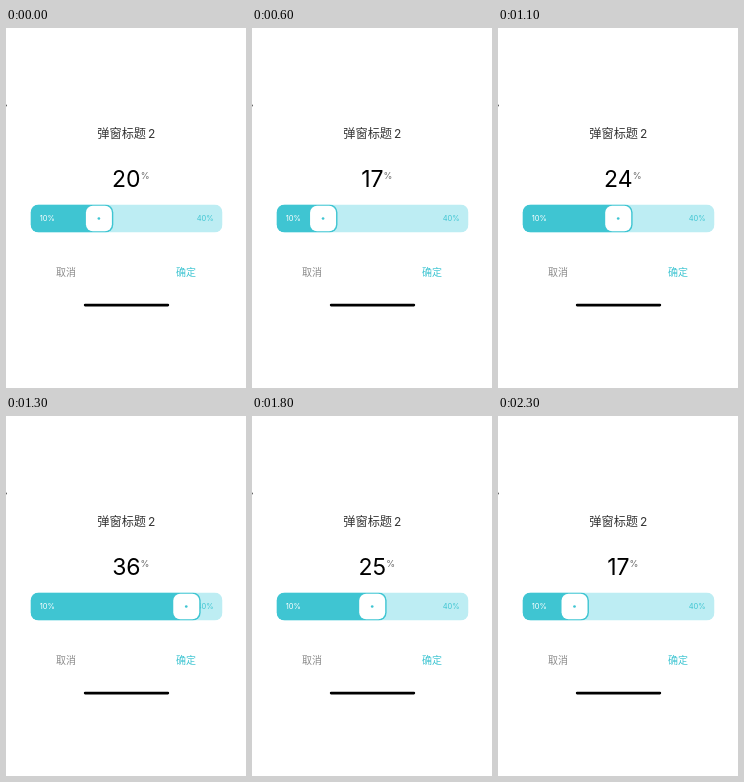
An HTML page for the animation above (2400 ms loop, 240x360 px).

```html
<!DOCTYPE html>
<html lang="zh-CN">
<head>
<meta charset="utf-8">
<title>弹窗标题 2</title>
<style>
  html, body { margin: 0; width: 100%; height: 100%; overflow: hidden; background: #fff; }
  svg { display: block; width: 100vw; height: 100vh; }
  text { font-family: Inter, "Noto Sans CJK SC", "Noto Sans CJK", sans-serif; }
  .han { font-family: "Noto Sans CJK SC", "Noto Sans CJK", sans-serif; }
  .accent { fill: #3fc5d2; }
</style>
</head>
<body>
<svg viewBox="0 0 240 360">
  <defs>
    <clipPath id="bar"><rect x="24.5" y="176.5" width="192" height="28" rx="8"/></clipPath>
  </defs>
  <circle cx="0" cy="77.5" r="1" fill="#555"/>

  <text class="han" x="91.3" y="110.3" font-size="12.2" fill="#333">弹窗标题</text>
  <text x="142" y="110.3" font-size="12" fill="#333">2</text>

  <text x="124.8" y="159.3" text-anchor="middle" font-size="23" fill="#000"><tspan id="num">20</tspan><tspan dy="-8.3" font-size="9" fill="#666">%</tspan></text>

  <g clip-path="url(#bar)">
    <rect x="24.5" y="176.5" width="192" height="28" fill="#bdedf3"/>
    <text class="accent" x="190.7" y="193.2" font-size="7.5">40%</text>
    <rect id="fill" class="accent" x="24.5" y="176.5" height="28" rx="8"/>
    <text x="33.7" y="193.2" font-size="7.5" fill="#fff">10%</text>
    <g id="knob">
      <rect x="-13" y="177.8" width="26" height="25.5" rx="7" fill="#fff"/>
      <circle class="accent" cy="190.5" r="1.35"/>
    </g>
  </g>

  <text class="han" x="60" y="248" text-anchor="middle" font-size="10" fill="#8a8a8a">取消</text>
  <text class="han accent" x="180" y="248" text-anchor="middle" font-size="10" font-weight="500">确定</text>
  <rect x="77.8" y="275.7" width="85.4" height="2.7" rx="1.35" fill="#000"/>
</svg>
<script>
  const LOOP = 2400, STEP = 100;
  // Slider percentage for each step of the drag
  const drag = [
    20, 21, 22, 22, 22,
    20, 16, 14, 13, 15, 19,
    25, 31, 36, 39, 40, 40,
    33, 25, 21, 18, 17, 17, 17
  ];
  // Steps where the readout trails the knob
  const lag = { 6: 17, 11: 24 };

  const el = id => document.getElementById(id);
  const num = el('num'), fill = el('fill'), knob = el('knob');
  const knobX = v => 38.3 + (v - 10) * 5.46;

  let last = -1;
  function draw() {
    const i = Math.floor(performance.now() % LOOP / STEP);
    if (i !== last) {
      const v = drag[i], x = knobX(v);
      num.textContent = lag[i] || v;
      fill.setAttribute('width', x + 14.4 - 24.5);
      knob.setAttribute('transform', `translate(${x} 0)`);
      last = i;
    }
    requestAnimationFrame(draw);
  }
  draw();
</script>
</body>
</html>
```
